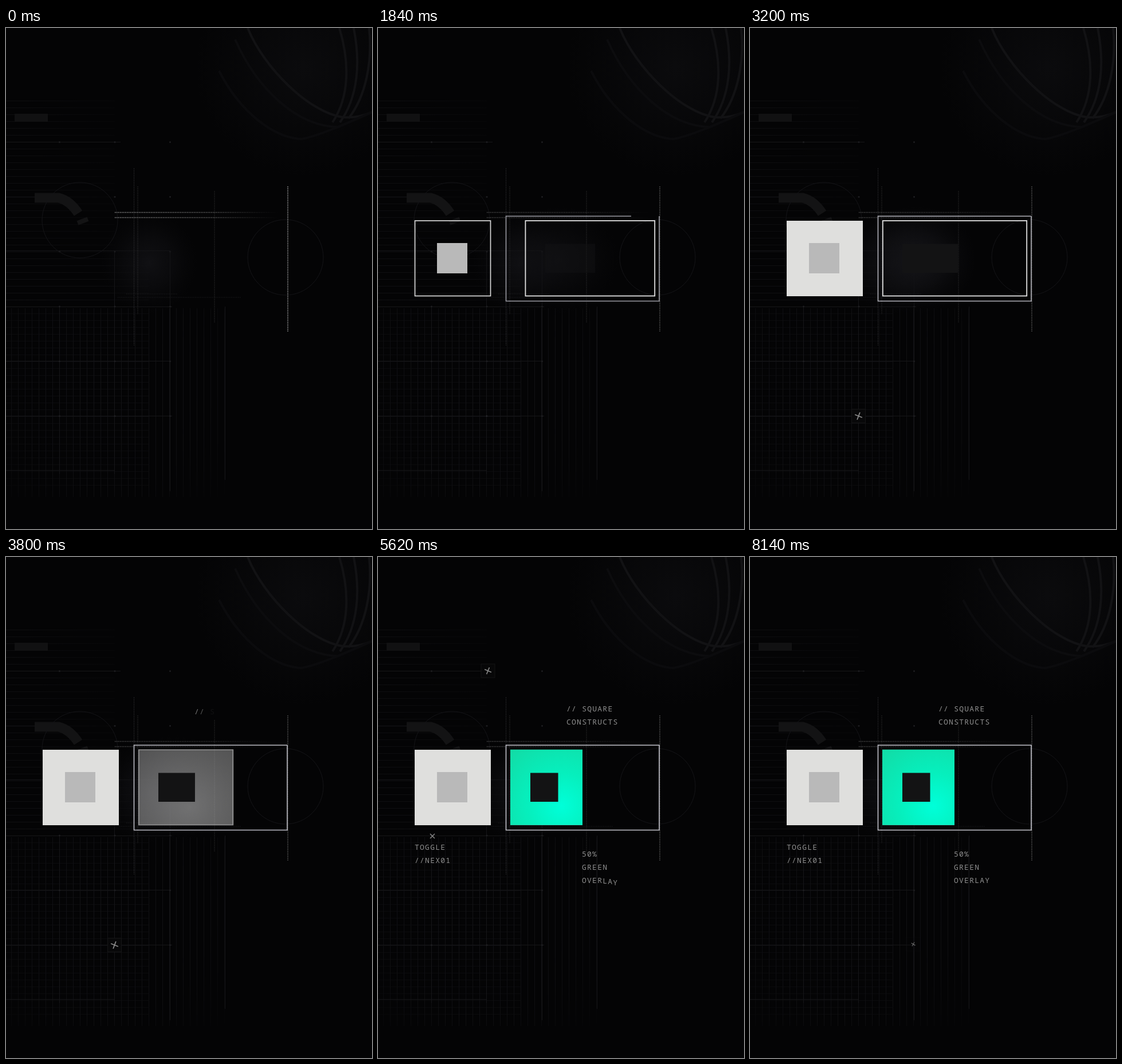
Recreate the animation shown at these times as an HTML page. Size 639 by 876 pixels, loop 8340 ms.

```html
<!DOCTYPE html>
<html lang="en">
<head>
<meta charset="utf-8">
<title>Square constructs</title>
<style>
  html, body { margin: 0; width: 100%; height: 100%; overflow: hidden; background: #040405; }
  svg { display: block; width: 100vw; height: 100vh; }
  text { font: 13px "Noto Sans Mono", "DejaVu Sans Mono", monospace; fill: #8e8e8e; }
</style>
</head>
<body>
<svg id="stage" viewBox="0 0 639 876" fill="none">
  <defs>
    <radialGradient id="haze" gradientUnits="userSpaceOnUse" cx="520" cy="70" r="190">
      <stop stop-color="#0b0b0d"/><stop offset="1" stop-color="#0b0b0d" stop-opacity="0"/>
    </radialGradient>
    <radialGradient id="glow">
      <stop stop-color="#16161a"/><stop offset=".5" stop-color="#101013" stop-opacity=".7"/>
      <stop offset="1" stop-color="#0a0a0c" stop-opacity="0"/>
    </radialGradient>
    <radialGradient id="gridFade" gradientUnits="userSpaceOnUse" cx="170" cy="620" r="300">
      <stop stop-color="#fff"/><stop offset=".6" stop-color="#bbb"/><stop offset="1" stop-color="#000"/>
    </radialGradient>
    <mask id="gridMask" maskUnits="userSpaceOnUse" x="0" y="0" width="639" height="876">
      <rect width="639" height="876" fill="url(#gridFade)"/>
    </mask>
    <linearGradient id="streak" gradientUnits="userSpaceOnUse" x1="0" y1="0" x2="290" y2="0">
      <stop stop-color="#17171a"/><stop offset="1" stop-color="#17171a" stop-opacity="0"/>
    </linearGradient>
    <linearGradient id="rail" gradientUnits="userSpaceOnUse" x1="190" y1="0" x2="475" y2="0">
      <stop stop-color="#999"/><stop offset=".6" stop-color="#666"/><stop offset="1" stop-color="#444" stop-opacity="0"/>
    </linearGradient>
    <radialGradient id="gray" gradientUnits="userSpaceOnUse" cx="322" cy="437" r="135">
      <stop stop-color="#bebebe"/><stop offset="1" stop-color="#8b8b8b"/>
    </radialGradient>
    <radialGradient id="green" gradientUnits="userSpaceOnUse" cx="320" cy="435" r="130">
      <stop stop-color="#00ffd9"/><stop offset=".45" stop-color="#06efbd"/><stop offset="1" stop-color="#12dca6"/>
    </radialGradient>
  </defs>

  <rect width="639" height="876" fill="#040405"/>
  <rect x="330" width="309" height="270" fill="url(#haze)"/>
  <g stroke="#121214" stroke-width="4">
    <path d="M422 0C450 70 530 148 588 156Q615 158 639 147"/>
    <path d="M582 0C600 60 600 120 570 165"/>
    <path d="M607 0C619 60 615 120 583 165"/>
    <path d="M634 0C640 60 628 120 598 158"/>
    <path d="M400 20C440 110 510 172 580 173L639 147" stroke="#0c0c0e"/>
    <path d="M372 75C410 150 470 192 515 194Q545 190 639 147" stroke="#0b0b0d"/>
  </g>
  <g id="grid" stroke-width="1"></g>
  <ellipse cx="250" cy="410" rx="85" ry="90" fill="url(#glow)" opacity=".7"/>
  <ellipse id="knobGlow" cy="405" rx="105" ry="95" fill="url(#glow)"/>
  <path d="M15 157H73" stroke="#111112" stroke-width="14"/>
  <path d="M50 297H92Q112 302 126 324" stroke="#131314" stroke-width="17"/>
  <path d="M125 341L143 334" stroke="#131314" stroke-width="8"/>
  <g stroke="#141417">
    <circle cx="129" cy="336" r="66"/>
    <circle cx="488" cy="401" r="66"/>
  </g>
  <g stroke-dasharray="1.5 1.5">
    <path d="M223.500 245V555M230 277V500M364 285V515" stroke="#303033"/>
    <path d="M195 471H410M210 465H300" stroke="#1b1b1d"/>
    <path id="rails" d="M190 322.500H475M190 331.500H475" stroke="url(#rail)" stroke-width="1.300"/>
    <path id="axis" d="M492 277V531" stroke="#a5a5a5" stroke-width="1.500"/>
  </g>

  <path id="frame" d="M491 329V477.500H223.500V329Z" pathLength="1" stroke-width="1.600"/>

  <rect id="padFill" x="64" y="337" width="133" height="132" fill="#dfdfdd"/>
  <rect id="padLine" x="64.500" y="337" width="132" height="131.500" pathLength="1" stroke="#d8d8d8" stroke-width="1.700"/>
  <rect id="padCore" x="-26.500" y="-26.500" width="53" height="53" fill="#b9b9b9"/>

  <rect id="knobGray" fill="url(#gray)"/>
  <rect id="knobGreen" fill="url(#green)"/>
  <rect id="knobLine" pathLength="1" stroke="#e2e2e2" stroke-width="1.800"/>
  <rect id="knobCore" fill="#131314"/>

  <g id="marks"></g>
  <g id="labels"></g>
</svg>
<script>
const LOOP = 8340;
const $ = id => document.getElementById(id);
const clamp = v => Math.min(1, Math.max(0, v));
const span = (t, start, length) => clamp((t - start) / length);
const easeOut = (u, power = 3) => 1 - (1 - u) ** power;
const easeInOut = u => u < .5 ? 4 * u ** 3 : 1 - 4 * (1 - u) ** 3;
const mix = (a, b, u) => a + (b - a) * u;

function set(el, attrs) {
  for (const key in attrs) el.setAttribute(key, attrs[key]);
  return el;
}
function add(parent, tag, attrs) {
  return parent.appendChild(set(document.createElementNS('http://www.w3.org/2000/svg', tag), attrs));
}
function trim(el, u) {
  set(el, { 'stroke-dasharray': u < 1 ? `${u} 2` : 'none', visibility: u > 0 ? 'visible' : 'hidden' });
}

function buildGrid() {
  const grid = $('grid');
  const fine = add(grid, 'g', { mask: 'url(#gridMask)', stroke: '#131316' });
  for (let x = 9; x < 385; x += 12) add(fine, 'path', { d: `M${x + .5} 490V820` });
  const rows = add(fine, 'g', { opacity: .65 });
  for (let y = 391; y < 800; y += 12) add(rows, 'path', { d: `M0 ${y + .5}H250` });
  const upper = add(grid, 'g', { stroke: 'url(#streak)', opacity: .55 });
  for (let y = 127; y < 480; y += 12) add(upper, 'path', { d: `M0 ${y + .5}L190 ${y + .51}` });
  const main = add(grid, 'g', { stroke: '#161618' });
  [[93, 487, 780], [189, 389, 780], [286, 389, 810], [382, 487, 790]]
    .forEach(([x, a, b]) => add(main, 'path', { d: `M${x + .5} ${a}V${b}` }));
  [[199, 200], [295, 100], [389, 286], [487, 290], [582, 286], [678, 290], [773, 190]]
    .forEach(([y, end]) => add(main, 'path', { d: `M0 ${y + .5}H${end}` }));
  for (let x = 93; x < 300; x += 96.500)
    for (let y = 199; y < 690; y += 95.800) add(grid, 'circle', { cx: x + .5, cy: y + .5, r: 1.500, fill: '#1e1e21' });
}

function buildLabel(lines, x, y, start) {
  let index = 0;
  return lines.flatMap((line, row) => [...line].map((char, col) => {
    const el = add($('labels'), 'text', { x: x + col * 9.050, y: y + row * 23.200 });
    el.textContent = char;
    return { el, settle: start + 30 * index++ };
  }));
}

function buildMark(x, y, start, life, size, box) {
  const group = add($('marks'), 'g', {});
  const frame = add(group, 'rect', { x: -12, y: -12, width: 24, height: 24, stroke: '#161617', fill: '#080809' });
  const cross = add(group, 'path', { d: 'M-4 -4L4 4M4 -4L-4 4', stroke: '#8c8c8c', 'stroke-width': 1.400 });
  return { group, frame, cross, x, y, start, life, size, box };
}

buildGrid();
const letters = [
  ...buildLabel(['// SQUARE', 'CONSTRUCTS'], 329, 270, 4000),
  ...buildLabel(['TOGGLE', '//NEX01'], 64, 512, 4120),
  ...buildLabel(['50%', 'GREEN', 'OVERLAY'], 356, 524, 5190)
];
const marks = [
  buildMark(189.500, 678.500, 1750, 2700, 1.200, 1),
  buildMark(95, 488, 3900, 2300, 1, 0),
  buildMark(192, 199, 5000, 2900, 1.200, 1),
  buildMark(285, 677, 6700, 1650, 1.200, 1)
];

function drawFrame(t) {
  const u = easeOut(span(t, 92, 4046), 5);
  trim($('frame'), u);
  const tone = Math.round(mix(140, 196, span(t, 1000, 3200)));
  set($('frame'), { stroke: `rgb(${tone},${tone},${tone + 8})` });
  const settle = span(t, 20, 250);
  set($('rails'), { opacity: mix(1, .5, settle) });
  set($('axis'), { opacity: mix(1, .55, settle) });
}

function drawPad(t) {
  trim($('padLine'), easeInOut(span(t, 300, 700)));
  const flash = .36 * span(t, 1000, 80) * (1 - span(t, 1200, 200));
  const fill = span(t, 1950, 600);
  set($('padFill'), { opacity: Math.max(flash, fill) });
  set($('padLine'), { opacity: Math.max(0, 1 - flash * 2.600) * (1 - fill) });
  const grow = easeOut(span(t, 1085, 700));
  set($('padCore'), { transform: `translate(129.500 402.500) rotate(${57 * (1 - grow)}) scale(${grow})` });
}

function drawKnob(t) {
  const left = mix(350.500, 231, easeInOut(span(t, 1000, 1350)));
  const right = mix(484, 357, easeOut(span(t, 3300, 2000), 4));
  const width = right - left;
  const body = { x: left, y: 336.800, width, height: 131.900 };
  const fill = span(t, 3400, 700);
  const green = easeInOut(span(t, 4500, 900));
  set($('knobGray'), { ...body, opacity: fill });
  set($('knobGreen'), { ...body, opacity: green });
  // The outline lies inside the body's edge.
  set($('knobLine'), { x: left + .8, y: 337, width: width - 1.600, height: 131.500, opacity: 1 - fill });
  trim($('knobLine'), easeInOut(span(t, 300, 700)));
  const reveal = span(t, 1140, 1400);
  set($('knobCore'), { x: left + 35, y: 377.500, width: width * .385, height: 50.500, opacity: reveal });
  set($('knobGlow'), { cx: left + 60, opacity: reveal * (1 - fill) });
}

function drawMark(mark, t) {
  const u = span(t, mark.start, mark.life);
  const swell = Math.min(1, Math.sin(Math.PI * u) * 1.500);
  set(mark.group, {
    transform: `translate(${mark.x} ${mark.y})`,
    visibility: u > 0 && u < 1 ? 'visible' : 'hidden'
  });
  set(mark.frame, { opacity: mark.box * span(swell, .5, .5) });
  const turn = mark.box ? -24 * swell : 0;
  set(mark.cross, {
    transform: `rotate(${turn}) scale(${mark.size * swell})`,
    opacity: .5 + .5 * swell
  });
}

function drawLetter({ el, settle }, t) {
  const drop = 4.500 * (1 - easeOut(span(t, settle, 90), 2));
  set(el, { transform: `translate(0 ${drop})`, opacity: span(t, settle - 300, 120) });
}

function render(t) {
  drawFrame(t);
  drawPad(t);
  drawKnob(t);
  marks.forEach(mark => drawMark(mark, t));
  letters.forEach(letter => drawLetter(letter, t));
}

const origin = performance.now();
function tick() {
  render((performance.now() - origin) % LOOP);
  requestAnimationFrame(tick);
}
tick();
</script>
</body>
</html>
```
